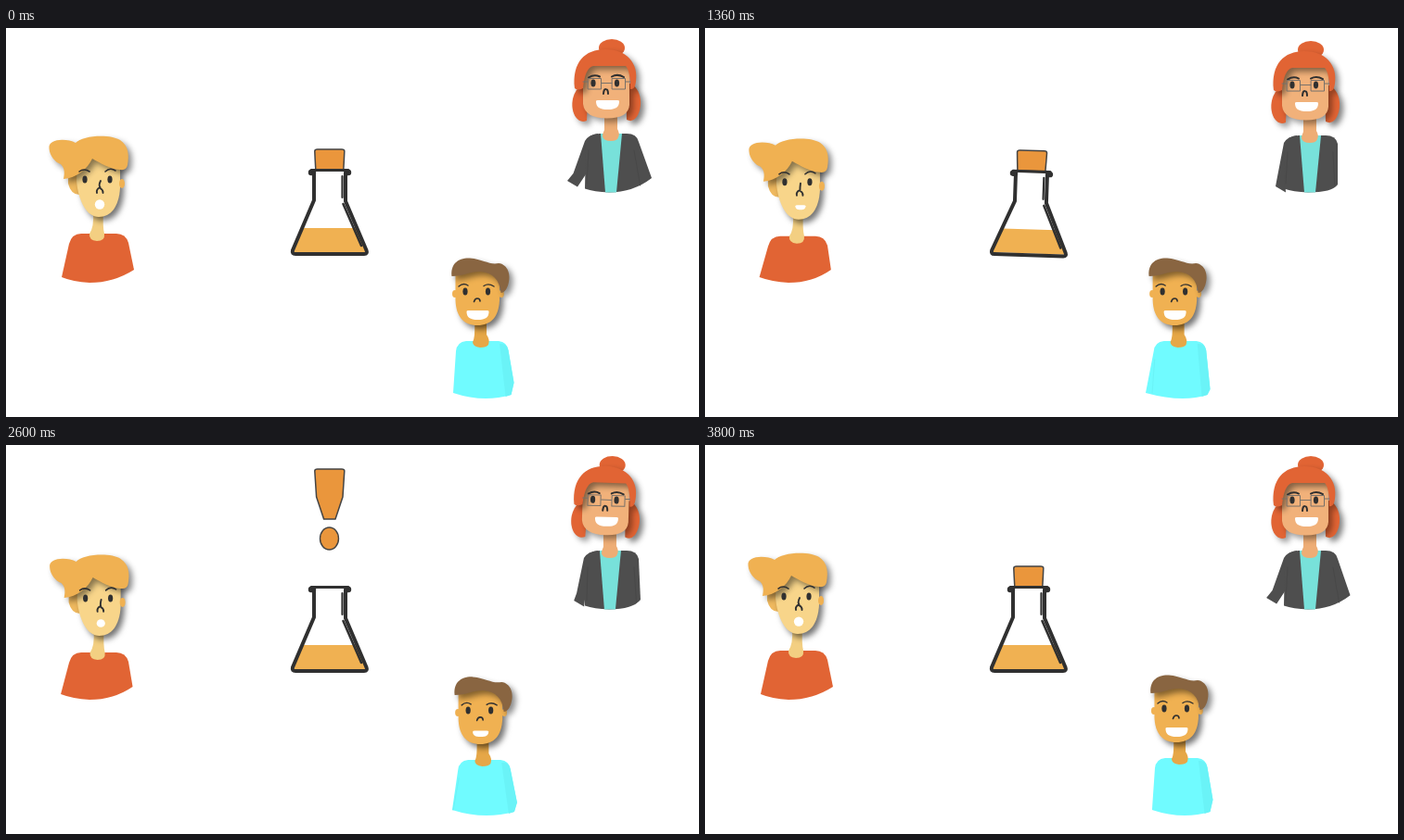
An HTML page with a canvas that plays this animation: 747x420 px, repeating every 3840 ms.

```html
<!DOCTYPE html>
<html lang="en">
<head>
<meta charset="utf-8">
<title>Flask idea</title>
<style>
html, body { margin: 0; width: 100%; height: 100%; overflow: hidden; background: #fff; }
canvas { display: block; width: 747px; height: 420px; }
</style>
</head>
<body>
<canvas id="stage" width="747" height="420"></canvas>
<script>
const ctx = document.getElementById('stage').getContext('2d');
const LOOP = 3840, IDLE = 1920, STEP = 40;
const INK = '#303030', GOLD = '#f0b152', RED = '#e16434', CORK = '#ea963c', JACKET = '#4e4e4e';

const wave = x => Math.sin(Math.PI * x) ** 2;
const mix = (a, b, k) => a + (b - a) * k;
const smooth = k => k * k * (3 - 2 * k);

// Interpolates [time, ...values] keys with eased segments.
function keyed(t, keys) {
  let i = 1;
  while (i < keys.length - 1 && t > keys[i][0]) i++;
  const a = keys[i - 1], b = keys[i];
  const k = smooth(Math.min(1, Math.max(0, (t - a[0]) / (b[0] - a[0]))));
  return a.slice(1).map((v, n) => mix(v, b[n + 1], k));
}

function fill(d, color, shadow = 0) {
  ctx.save();
  if (shadow) {
    ctx.shadowColor = `rgba(0,0,0,${shadow})`;
    ctx.shadowBlur = 6;
    ctx.shadowOffsetX = 4;
    ctx.shadowOffsetY = 4;
  }
  ctx.fillStyle = color;
  ctx.fill(new Path2D(d));
  ctx.restore();
}

function stroke(d, width, color = INK) {
  ctx.lineWidth = width;
  ctx.lineCap = ctx.lineJoin = 'round';
  ctx.strokeStyle = color;
  ctx.stroke(new Path2D(d));
}

function oval(x, y, rx, ry, color, outline = 0) {
  ctx.beginPath();
  ctx.ellipse(x, y, rx, ry, 0, 0, 2 * Math.PI);
  ctx.fillStyle = color;
  ctx.fill();
  if (outline) {
    ctx.lineWidth = outline;
    ctx.strokeStyle = '#444';
    ctx.stroke();
  }
}

function eyes(x1, x2, y) {
  oval(x1, y, 2.6, 4, INK);
  oval(x2, y, 2.6, 4, INK);
}

function grin(x, y, w, h) {
  const l = x - w / 2, r = x + w / 2;
  fill(`M${l} ${y + 1}Q${l} ${y} ${l + 2} ${y}L${r - 2} ${y}Q${r} ${y} ${r} ${y + 1}
    C${r} ${y + h * .75} ${r - w * .15} ${y + h} ${x} ${y + h}
    C${l + w * .15} ${y + h} ${l} ${y + h * .75} ${l} ${y + 1}Z`, '#fff');
}

function posed(x, y, angle, px, py, draw) {
  ctx.save();
  ctx.translate(x + px, y + py);
  ctx.rotate(angle * Math.PI / 180);
  ctx.translate(-px, -py);
  draw();
  ctx.restore();
}

function blond(t) {
  const k = wave(t / 960), dy = 3 * k;
  const l = 60 - 1.5 * k, r = 138 - 2.3 * k, top = 222 + dy;
  fill(`M${l} 269L68 ${top + 11}Q71 ${top} 81 ${top}L119 ${top}Q129 ${top} 132 ${top + 10}
    L${r} 261Q116 275 90 275Q72 274 ${l} 269Z`, RED);
  posed(k, dy, 0, 0, 0, () => {
    fill('M94 199L105 199Q104 214 106 222Q107 230 98 230Q89 229 90 222Q95 215 94 199Z', '#f3cf82');
    fill('M67 160L78 157L79 180Q70 180 67 168Z', '#efb95f');
    fill('M77 138L123 138L123 172C122 193 113 204 100 204C87 204 78 187 76 165Z', '#f8d58a', .55);
    oval(125, 168, 3, 5, GOLD);
    fill(`M46.5 130C45 119 66 119 75 124C82 116 112 114 123 121C132 127 133 137 131 148
      Q130 154 123 153C111 152 102 146 93 141C88 152 76 162 62 163C64 154 62 150 59 147C53 145 47 138 46.5 130Z`, GOLD, .45);
    eyes(85, 112, 163.5);
    stroke('M79 155Q84 151 90 155M107 155Q112 150 118 154', 1.6);
    const bend = 2 * (1 - k);
    stroke(`M102 165Q${101.5 - bend} 170 101.5 172Q97 174 98 178M101.5 173Q105 175 104.5 178`, 1.9);
    if (k > .82) grin(102, 188.5, 11, 5);
    else oval(101 + k, 190.5, 5.2 - k, 5.2 - 1.5 * k, '#fff');
  });
}

function redhead(t) {
  const lean = t < 960 ? 2.8 * wave(t / 960) : 0;
  const dy = t < 960 ? 0 : 2.2 * wave(t / 960);
  const [lx, ly] = keyed(t, [[0, 605, 165], [360, 603, 163], [640, 612, 168], [1040, 618, 171], [1360, 615, 171], [1920, 605, 165]]);
  const [rx, ry] = keyed(t, [[0, 696, 162], [360, 686, 164], [640, 684, 167], [1040, 683, 169], [1360, 682, 169], [1640, 687, 167], [1920, 696, 162]]);
  const dx = -lean * .6, top = 114 + dy;
  fill(`M${lx} ${ly}L${mix(618, lx, .5)} ${ly - 8}L${624 + dx} ${top + 8}Q${628 + dx} ${top + 1} 638 ${top}
    L637 150L625 158L${lx + 11} ${ly + 6.5}Z`, JACKET);
  fill(`M624 173.5L${625 + dx} ${top + 10}Q${628 + dx} ${top} 640 ${top}L669 ${top}Q680 ${top} 682 ${top + 9}
    L${rx} ${ry}Q676 177.5 650 177.5Q634 177 624 173.5Z`, JACKET);
  stroke(`M${628 + dx} ${top + 18}L626 168M677 ${top + 18}L${mix(677, rx, .35)} 170`, 1, '#484848');
  posed(dx, dy, 0, 0, 0, () => {
    fill(`M641 114L664 114L658 ${177.5 - dy}L646 ${177.5 - dy}Z`, '#78e1da');
    fill('M645 94L659 94L659 109Q662 114 660 118Q659 122 652 122Q644 122 643 117Q643 114 645 110Z', '#eead75');
  });
  posed(0, dy, lean, 655, 45, () => {
    fill('M620 62C609 70 608 87 614 96Q619 103 626 100L628 60Z', RED, .4);
    fill('M674 60C687 69 686 88 679 97Q675 102 669 99L668 60Z', RED, .5);
    oval(653, 21.5, 14, 9.5, RED);
    fill('M622 38L672 38L672 83Q671 97.5 648 97.5Q624 97.5 622 82Z', '#f1b17a', .4);
    fill(`M613 65C610 37 624 23 646 23C669 23 682 38 679 58Q678 67 673 66Q673 46 668 41
      L633 41Q624 43 622 65Q616 68 613 65Z`, RED, .45);
    eyes(633, 658.5, 59.5);
    stroke('M628 53.5Q634 49.5 640 52.5M653 52.5Q659 49 666 53', 2);
    ctx.lineWidth = 1;
    ctx.strokeStyle = '#77716a';
    ctx.strokeRect(627.5, 54.5, 14, 11.5);
    ctx.strokeRect(653.5, 54.5, 14, 11.5);
    stroke('M642 59.5L653 59.5M622 58L627 58M668 58L673 58', 1, '#77716a');
    stroke('M644 71Q644.5 65.5 646.5 66Q649 66 649 71', 2);
    const [open] = keyed(t, [[0, 1], [720, 1], [1040, 0], [1320, 1], [1920, 1]]);
    grin(648.5, mix(81, 78, open), mix(13, 25, open), mix(5.5, 10, open));
  });
}

function brunet(t) {
  const k = wave(t / 960), first = t < 960;
  const dx = (first ? 5 : -2) * k, dy = first ? 3 * k : 0;
  const [l, r, ry] = keyed(t, [[0, 482, 547.5, 383], [360, 482, 552, 388], [640, 481, 551, 386], [1040, 479, 547, 387], [1360, 475, 544.5, 390], [1920, 482, 547.5, 383]]);
  const top = 338 + dy, sx = dx * .7;
  fill(`M${l} 394L${485 + sx} ${top + 11}Q${486 + sx} ${top + 1} ${496 + sx} ${top}L${531 + sx} ${top}
    Q${540 + sx} ${top + 1} ${541.5 + sx} ${top + 10}L${r} ${ry}L${r - 3} 396Q515 405 ${l} 394Z`, '#70fbff');
  fill(`M${532 + sx} ${top + 3}Q${540 + sx} ${top + 2} ${541.5 + sx} ${top + 10}L${r} ${ry}L${r - 3} 396
    L${r - 9} 398Z`, '#6af3f7');
  if (l < 481) stroke(`M${486 + sx} ${top + 20}L482 394`, 1, '#6af3f7');
  posed(dx * .75, dy, 0, 0, 0, () =>
    fill('M505 315L518 315L518 331Q522 337 520 342Q518 345 511 345Q503 344 503 339Q506 334 505 315Z', '#e6a747'));
  posed(dx, dy, 0, 0, 0, () => {
    fill('M484.5 260L532 260L532 294C531 312 523 321 508 321C493 321 485 311 484.5 294Z', GOLD, .55);
    oval(484, 287, 3, 4, GOLD);
    oval(534, 287, 2.8, 4, GOLD);
    fill(`M480.5 268C479 255 487 248 500 248.5C515 250 521 256 531 254C541 255 545 267 541 278
      Q538 286 533.5 286C532 272 525 264 511 263C500 263 493 268 480.5 268Z`, '#896541', .45);
    eyes(495, 519.5, 284.5);
    stroke('M488 279Q493 274.5 498 278M515 278.5Q520 275 526 279', 1.4);
    stroke('M504.5 295.5Q505.5 292 508 292Q511 292 511 295', 1.6);
    const [open] = keyed(t, [[0, 1], [360, 1], [640, .4], [1040, 0], [1320, 1], [1920, 1]]);
    grin(508.5, mix(307.5, 305, open), mix(12.5, 24, open), mix(4.5, 10, open));
  });
}

function flaskBody() {
  fill('M320 216L377 216L388 242L310 242Z', GOLD);
  stroke('M332 156L332 186L309 240Q308 244 312 244L386 244Q390 244 388.5 240L366 187L366 156', 4);
  stroke('M362.5 160L362.5 183', 2.2);
  stroke('M363.5 190L383 235', 2.6);
  stroke('M329 153.5L369 153.5', 3.2);
  stroke('M329 156L331 156M368 156L369 156', 6.4);
}

// The stopper stretches into an exclamation mark and back.
function stopper(t) {
  const cork = [131, 16, 142, 15.6, 153, 15, 146, 0, 0];
  const mark = [37, 14.8, 60, 13, 76, 5.8, 92, 9.2, 9];
  const tall = [26, 16, 56, 14.2, 80, 6.2, 101, 10, 12];
  const [y0, w0, y1, w1, y2, w2, dotY, rx, ry] = keyed(t, [
    [1920, ...cork], [2280, ...mark], [2600, ...tall], [3080, ...tall], [3400, ...mark], [3760, ...cork]
  ]);
  const x = 348.8;
  if (rx > .3) oval(x - .3, dotY, rx, ry, CORK, 1.4);
  const d = `M${x - w0} ${y0 + 2}Q${x - w0} ${y0} ${x - w0 + 3} ${y0}L${x + w0 - 3} ${y0}
    Q${x + w0} ${y0} ${x + w0} ${y0 + 2}L${x + w1} ${y1}L${x + w2} ${y2}L${x - w2} ${y2}L${x - w1} ${y1}Z`;
  fill(d, CORK);
  stroke(d, 1.5, '#444');
}

function flask(t) {
  const sway = t < IDLE ? -Math.sin(2 * Math.PI * t / IDLE) : 0;
  posed(0, 1.4 * Math.abs(sway), 2 * sway, 349, 244, () => {
    stopper(t);
    flaskBody();
  });
}

function frame(now) {
  const t = Math.floor(now % LOOP / STEP) * STEP;
  const idle = t % IDLE;
  ctx.fillStyle = '#fff';
  ctx.fillRect(0, 0, 747, 420);
  blond(idle);
  redhead(idle);
  brunet(idle);
  flask(t);
}

const start = performance.now();
function tick() {
  frame(performance.now() - start);
  requestAnimationFrame(tick);
}
tick();
</script>
</body>
</html>
```
